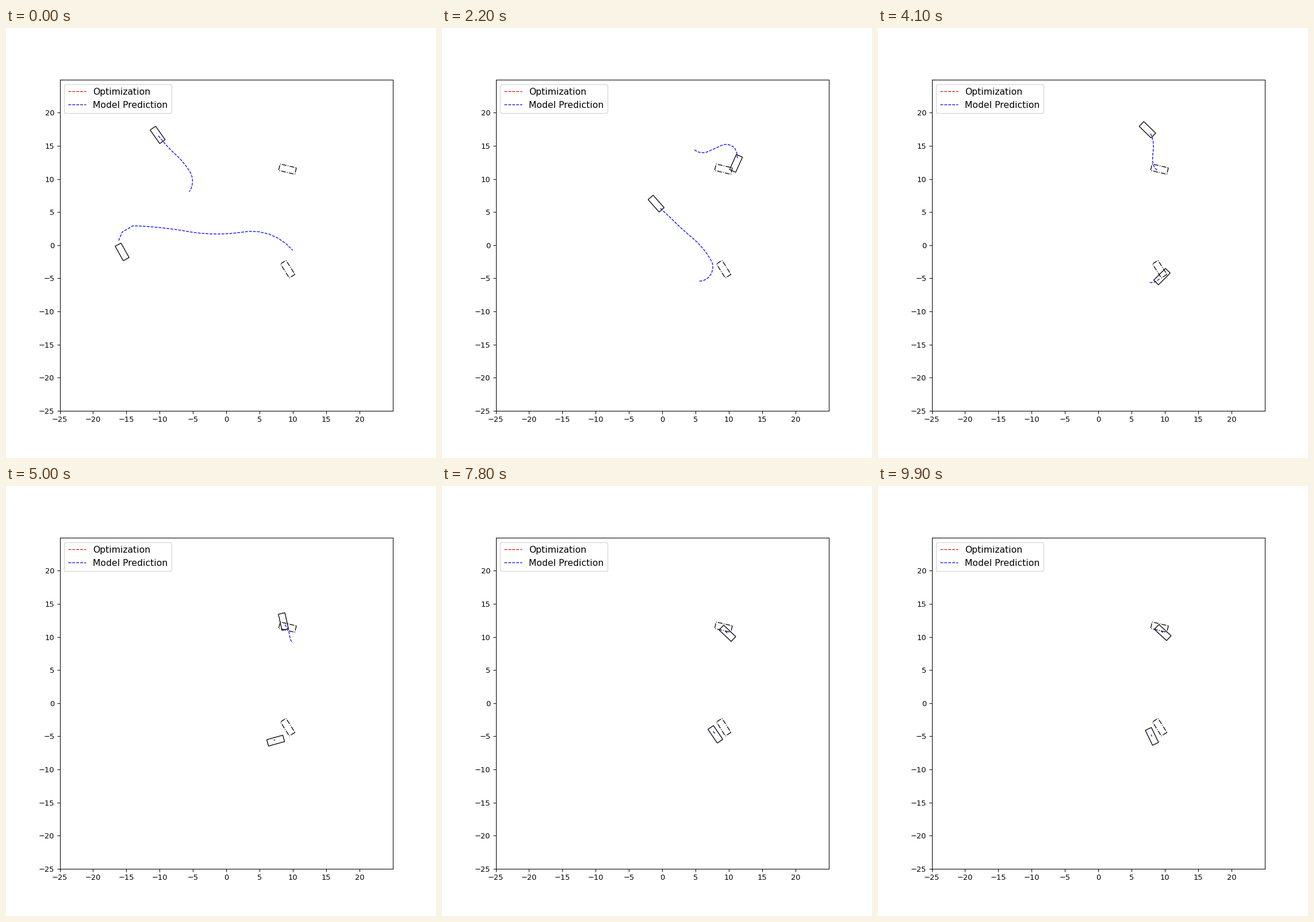
Recreate the animation shown at these times as a matplotlib script. Size 748 by 748 pixels, loop 10000 ms.

```python
import numpy as np
import matplotlib.pyplot as plt
from matplotlib.animation import FuncAnimation
from matplotlib.patches import Polygon

FRAMES, INTERVAL = 100, 100
LENGTH, WIDTH = 2.5, 1.0
HORIZON, LEAD = 20, 3

# Drive: frame, x, y, heading (degrees), signed speed (negative = reverse)
# Plan: frame, signed length, heading offsets at 0, 1/3, 2/3 and 1 of the path
CARS = [
    dict(drive=[(0, -10.31, 16.65, -55, 0.15), (10, -7.32, 13.52, -44, 0.68),
                (22, -0.94, 6.27, -48.7, 0.95), (34, 8.08, -0.98, -38, 1),
                (41, 9.54, -4.75, -135, 0.55), (53, 7.26, -5.57, -174, 0),
                (60, 8.55, -5.71, -187, -0.25), (68, 8.85, -5.45, -219, 0),
                (78, 7.95, -4.71, -236, 0.13), (83, 7.6, -4.24, -238, 0),
                (99, 8.04, -5.02, -244.5, 0)],
         plan=[(0, 9.85, 0, 9, -6, -72), (10, 14, 0, 7, 13, -82),
               (22, 13.6, 0, 6, -14, -136), (41, 0.95, -15, -25, -35, -45),
               (60, -0.7, 10, 10, 10, 10), (78, 0.3, 0, 0, 0, 0)]),
    dict(drive=[(0, -15.64, -1.02, 119, 2.2), (3, -14, 2.93, 20, 2.3),
                (10, -2.83, 7.79, 20.7, 1.6), (18, 7.47, 11.09, 6, 1.15),
                (22, 11.05, 12.35, 66, 0.85), (29, 8.25, 16.82, 156, 0.9),
                (35, 4.54, 16.56, 206, 0), (41, 7.36, 17.43, 135.6, -0.8),
                (47, 8.21, 13.87, 90, -0.55), (58, 10.06, 10.24, 135.5, 0.03),
                (99, 9.66, 10.66, 137, 0)],
         plan=[(0, 24.9, -22, -30, -11, -70), (10, 15.8, 5, 7, -31, -110),
               (22, 6.65, 25, 100, 100, 35), (41, -4.65, -15, -31, -18, 32),
               (60, 0.75, 0, 0, 0, 0), (99, 0.35, 0, 0, 0, 0)]),
]
GOALS = [(9.17, 11.48, -13.5), (9.2, -3.63, -58)]


def direction(degrees):
    a = np.radians(degrees)
    return np.stack([np.cos(a), np.sin(a)], axis=-1)


def box(center, heading):
    along = direction(heading) * LENGTH / 2
    side = direction(heading + 90) * WIDTH / 2
    return center + np.array([along + side, along - side,
                              -along - side, -along + side])


def follow(keys):
    """Positions and headings per frame; velocity always lies along heading."""
    t, xy, heading, speed = keys[:, 0], keys[:, 1:3], keys[:, 3], keys[:, 4]
    frames = np.arange(FRAMES)
    i = np.clip(np.searchsorted(t, frames, side="right") - 1, 0, len(t) - 2)
    h = (t[i + 1] - t[i])[:, None]
    u = (frames - t[i])[:, None] / h
    vel = speed[:, None] * direction(heading)
    pos = ((1 + 2 * u) * (1 - u) ** 2 * xy[i] + u * (1 - u) ** 2 * h * vel[i]
           + u * u * (3 - 2 * u) * xy[i + 1] + u * u * (u - 1) * h * vel[i + 1])
    return pos, np.interp(frames, t, heading)


class Car:
    def __init__(self, ax, drive, plan):
        self.pos, self.heading = follow(np.array(drive, float))
        self.plan = np.array(plan, float)
        self.body = ax.add_patch(Polygon(box(self.pos[0], self.heading[0]),
                                         fill=False, ec="k", lw=1))
        self.line, = ax.plot([], [], "b--", lw=1)

    def path(self, k):
        """The next few positions, then a roll-out along the planned turns."""
        near = np.minimum(k + 1 + np.arange(LEAD), FRAMES - 1)
        length, *turns = [np.interp(k, self.plan[:, 0], col)
                          for col in self.plan.T[1:]]
        n = HORIZON - LEAD
        u = (np.arange(n) + 0.5) / n
        turn = np.interp(u, np.linspace(0, 1, len(turns)), turns)
        steps = length / n * direction(self.heading[near[-1]] + turn)
        far = self.pos[near[-1]] + np.cumsum(steps, axis=0)
        return np.vstack([self.pos[near], far])

    def update(self, k):
        self.body.set_xy(box(self.pos[k], self.heading[k]))
        self.line.set_data(*self.path(k).T)
        return self.body, self.line


fig, ax = plt.subplots(figsize=(8, 8), dpi=93.5)
ticks = np.arange(-25, 25, 5)
ax.set(xlim=(-25, 25), ylim=(-25, 25), xticks=ticks, yticks=ticks)

for x, y, heading in GOALS:
    ax.add_patch(Polygon(box(np.array([x, y]), heading),
                         fill=False, ec="k", lw=1, ls="-."))

ax.plot([], [], "r--", lw=1, label="Optimization")
ax.plot([], [], "b--", lw=1, label="Model Prediction")
ax.legend(loc="upper left", fontsize=12)

cars = [Car(ax, **spec) for spec in CARS]


def update(k):
    return [artist for car in cars for artist in car.update(k)]


anim = FuncAnimation(fig, update, frames=FRAMES, interval=INTERVAL,
                     repeat=True, repeat_delay=0)
plt.show()
```
